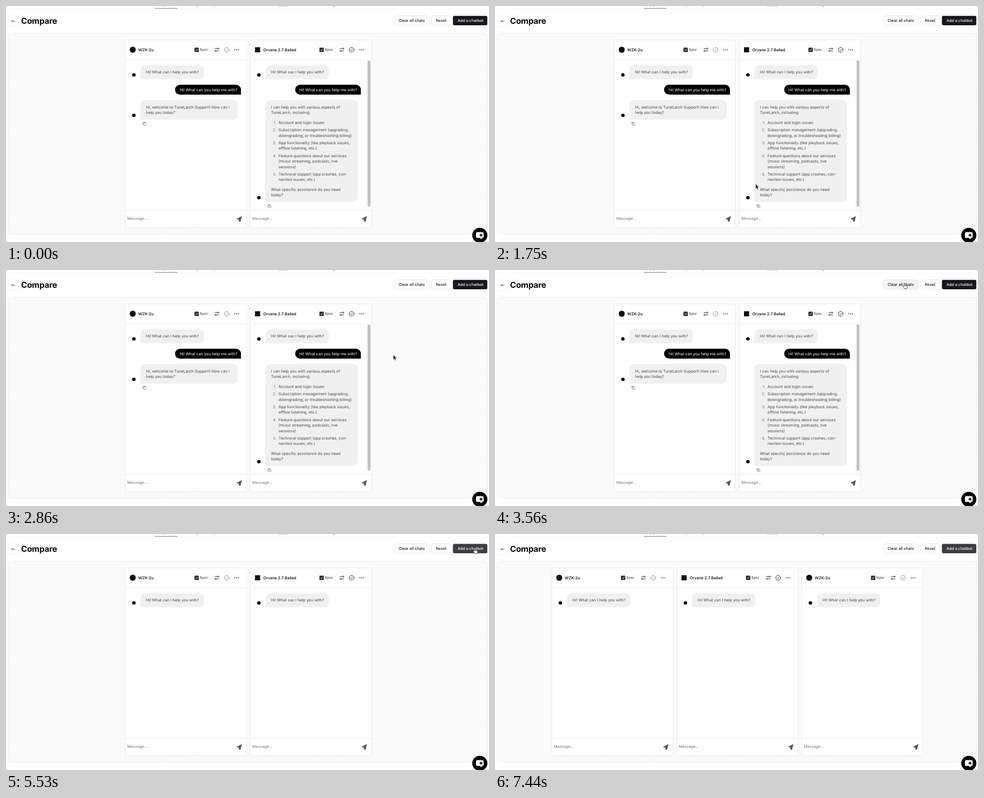
Recreate the animation shown at these times as an HTML page. Size 997x490 px, loop 8000 ms.

```html
<!DOCTYPE html>
<html lang="en">
<head>
<meta charset="utf-8">
<title>Compare</title>
<style>
  html, body { margin: 0; width: 100%; height: 100%; overflow: hidden; background: #fff; }
  svg { display: block; width: 100%; height: 100%; }
  text { font: 400 8px Inter, sans-serif; fill: #484848; text-rendering: geometricPrecision; white-space: pre; }
  .title { font-size: 17px; font-weight: 700; letter-spacing: -.2px; fill: #09090b; }
  .label { font-weight: 500; fill: #18181b; }
  .name { font-weight: 600; fill: #18181b; }
  .sync { font-size: 7px; font-weight: 500; fill: #333; }
  .said { fill: #fff; }
  .hint { fill: #757575; }
  .num { fill: #777; text-anchor: end; }
  .line { fill: none; stroke: #27272a; stroke-linecap: round; stroke-linejoin: round; }
</style>
</head>
<body>
<svg viewBox="0 0 997 490">
  <defs>
    <pattern id="dots" x="5" y="57" width="9.1" height="9.1" patternUnits="userSpaceOnUse">
      <circle cx="4.5" cy="4.5" r=".5" fill="#d9d9dc"/>
    </pattern>
    <linearGradient id="shade" x2="0" y2="1">
      <stop stop-color="#f4f4f4"/><stop offset="1" stop-color="#fff"/>
    </linearGradient>
    <clipPath id="body"><path d="M0 111H252V423H0z"/></clipPath>
  </defs>
  <rect width="997" height="490" fill="#fff"/>

  <g>
    <rect x="561" y="-6" width="23" height="8" rx="2" fill="#e6e3fa"/>
    <g id="tabs"></g>
    <path d="M0 6.5H997" stroke="#f7f7f7"/>
    <path d="M307 5H354" stroke="#66666a" stroke-width="1.2"/>
  </g>

  <rect x="4.5" y="20.5" width="22" height="22" rx="3" fill="#fff" stroke="#f1f1f2"/>
  <path class="line" d="M18.5 31.5H12M14.6 28.9L12 31.5L14.6 34.1" stroke-width=".8"/>
  <text class="title" x="31" y="36.5">Compare</text>
  <g id="buttons"></g>

  <rect x="4.5" y="56.5" width="989" height="417" rx="5" fill="#fafafa" stroke="#ececee"/>
  <rect x="5" y="57" width="988" height="416" rx="5" fill="url(#dots)"/>
  <g id="panels"></g>

  <circle cx="978" cy="476" r="15.6" fill="#000"/>
  <path d="M973 469.5h10a3 3 0 0 1 3 3v6a3 3 0 0 1-3 3h-1v3.2l-4-3.2h-5a3 3 0 0 1-3-3v-6a3 3 0 0 1 3-3z" fill="#fff"/>
  <path d="M980.5 471.8l1.2 2.8 2.8 1.2-2.8 1.2-1.2 2.8-1.2-2.8-2.8-1.2 2.8-1.2z" fill="#000"/>

  <g id="cursor">
    <path id="arrow" d="M0 0V10.2L2.3 8.1L3.9 11.8L5.6 11L4 7.4H7.2z" fill="#000" stroke="#fff" stroke-width=".7"/>
    <path id="hand" d="M-1 .6C-1-.6 .9-.6 .9 .6V4.2C1.2 3.3 2.6 3.5 2.7 4.5C3.1 3.8 4.3 4 4.4 4.9C4.9 4.4 6 4.7 6 5.7V8C6 9.4 5 9.9 5 11.2H-.4C-.5 9.8-2.4 8.3-3 6.5C-3.4 5.3-2.2 4.8-1.6 5.6L-1 6.5zM.9 4.2V6.2M2.7 4.5V6.2M4.4 4.9V6.2" fill="#fff" stroke="#222" stroke-width=".8" stroke-linejoin="round"/>
  </g>
</svg>

<script>
const LOOP = 8000, CLEARED = 4480, ADDED = 6430, SLIDE = 280;
const GAP = 258, FIRST_X = 246, SHIFT = 129;
const byId = id => document.getElementById(id);
const show = (node, on) => node.setAttribute('visibility', on ? 'visible' : 'hidden');
const text = (cls, x, y, value) => `<text class="${cls}" x="${x}" y="${y}">${value}</text>`;

byId('tabs').innerHTML = [[309, 'Playground'], [369, 'Activity'], [411, 'Analytics'], [653, 'Settings']]
  .map(([x, label]) => text('label', x, -1, label)).join('');

const buttons = [
  { x: 801, w: 73, label: 'Clear all chats', tx: 810.5, fill: '#fff', hover: '#f4f4f5', edge: '#e9e9eb' },
  { x: 878, w: 40, label: 'Reset', tx: 887.5, fill: '#fff', hover: '#f4f4f5', edge: '#e9e9eb' },
  { x: 922, w: 72, label: 'Add a chatbot', tx: 932, fill: '#18181b', hover: '#3d3d40', edge: 'none', cls: 'label said' }
];
byId('buttons').innerHTML = buttons.map(b =>
  `<rect x="${b.x + .5}" y="20.5" width="${b.w - 1}" height="19.5" rx="3" stroke="${b.edge}"/>` +
  `<text class="label" x="${b.tx}" y="33.2"${b.cls ? ' style="fill:#fafafa"' : ''}>${b.label}</text>`).join('');
const buttonRects = [...byId('buttons').querySelectorAll('rect')];

// A speech bubble with one tight lower corner.
function bubble(x, y, w, h, fill, tight) {
  const r = 10, l = tight === 'left' ? 1 : r, k = tight === 'left' ? r : 1;
  return `<path fill="${fill}" d="M${x + r} ${y}h${w - 2 * r}a${r} ${r} 0 0 1 ${r} ${r}V${y + h - k}` +
    `a${k} ${k} 0 0 1 ${-k} ${k}H${x + l}a${l} ${l} 0 0 1 ${-l} ${-l}V${y + r}a${r} ${r} 0 0 1 ${r} ${-r}z"/>`;
}
const avatar = y => `<circle cx="18" cy="${y}" r="3.6" fill="#000"/>`;
const copyIcon = (x, y) => `<g class="line" stroke-width=".7" style="stroke:#555">
  <rect x="${x + 1.8}" y="${y + 1.8}" width="4.6" height="4.6" rx=".8"/>
  <path d="M${x + .9} ${y + 4.6}q-.8 0-.8-.8v-3q0-.8.8-.8h3q.8 0 .8.8"/></g>`;
const lines = (x, rows) => rows.map(([y, s]) => text('', x, y, s)).join('');

const shortChat = bubble(103, 163.5, 136, 20.5, '#000', 'right') +
  text('said', 112.5, 176.5, 'Hi! What can you help me with?') +
  bubble(31.5, 195, 200.5, 41, '#f0f0f0', 'left') + avatar(227) +
  lines(43, [[212.8, 'Hi, welcome to TuneLarch Support! How can I'], [224.2, 'help you today?']]) +
  copyIcon(36.3, 241.3);

const topics = [
  [245.2, 'Account and login issues'],
  [260.4, 'Subscription management (upgrading,', 'downgrading, or troubleshooting billing)'],
  [287, 'App functionality (like playback issues,', 'offline listening, etc.)'],
  [313.8, 'Feature questions about our services', '(music streaming, podcasts, live', 'sessions)'],
  [351.8, 'Technical support (app crashes, con-', 'nection issues, etc.)']
];
const longChat = bubble(93, 163.5, 135.5, 20.5, '#000', 'right') +
  text('said', 101.7, 176.5, 'Hi! What can you help me with?') +
  bubble(31.5, 195, 190.5, 212, '#f0f0f0', 'left') + avatar(398) +
  lines(43, [[212.8, 'I can help you with various aspects of'], [224.2, 'TuneLarch, including:'],
    [384, 'What specific assistance do you need'], [395.4, 'today?']]) +
  topics.map(([y, ...rows], i) => text('num', 54, y, i + 1 + '.') +
    lines(58.6, rows.map((s, k) => [y + 11.4 * k, s]))).join('') +
  copyIcon(36.3, 412.5) +
  `<path d="M240.5 112V423" stroke="#f2f2f2"/>
   <rect class="thumb" x="242.4" y="113.5" width="6" height="302.5" rx="1"/>`;

function panel(name, mark, checkColor, chat) {
  return `<g>
    <rect x=".5" y="70.5" width="250" height="389" rx="3" fill="#fff" stroke="#ececed"/>
    <rect x="1" y="110" width="249" height="4" fill="url(#shade)"/>
    ${mark}${text('name', 27, 93.8, name)}
    <rect x="143" y="86.4" width="9" height="9" rx="1.2" fill="#2e2e31"/>
    <path d="M145.1 91L146.8 92.8L150 89" fill="none" stroke="#fff"/>
    ${text('sync', 154, 93.4, 'Sync')}
    <path d="M175.5 85V97" stroke="#ececed"/>
    <g class="line"><path d="M185.2 88.6H190M187.5 93.3H193.5"/>
      <circle cx="191.7" cy="88.6" r="1.5"/><circle cx="186.4" cy="93.3" r="1.5" fill="#fff"/>
      <circle cx="209.5" cy="91" r="4.9" stroke="${checkColor}"/>
      <path d="M207.4 91.1L209 92.6L211.7 89.6" stroke="${checkColor}"/></g>
    <path d="M226.4 91h.01M230 91h.01M233.6 91h.01" class="line" stroke-width="2"/>
    <g clip-path="url(#body)">
      ${bubble(31.5, 123, 131, 29, '#f0f0f0', 'left')}${avatar(143)}
      ${text('', 43, 140.1, 'Hi! What can I help you with?')}
      <g class="chat">${chat}</g>
    </g>
    <path d="M1 423.5H250" stroke="#ececed"/>
    ${text('hint', 4.5, 444, 'Message...')}
    <path d="M230.4 441.8L240.6 436.8L237.8 447.8L234.8 446.4V443.3z" fill="#555" stroke="#555" stroke-width=".6" stroke-linejoin="round"/>
  </g>`;
}

const round = '<circle cx="15.6" cy="90.8" r="6.3" fill="#111"/>';
const square = '<rect x="10" y="85.6" width="10.6" height="10.6" fill="#111"/>';
byId('panels').innerHTML =
  panel('WZK-2u', round, '#8a8a8e', shortChat) +
  panel('Orvane 2.7 Ballad', square, '#18181b', longChat) +
  panel('WZK-2u', round, '#8a8a8e', '');
const panels = [...byId('panels').children];
const chats = document.querySelectorAll('.chat');
const thumb = document.querySelector('.thumb');

// Pointer stops: time, x, y.
const path = [
  [1570, 430, 478], [1750, 538, 369.5], [2350, 747.3, 315], [2480, 747.3, 315],
  [3230, 849, 44], [3360, 849, 44], [3560, 845, 27.5], [5130, 845, 27.5], [5530, 967.5, 29.5]
];
const clamp = v => Math.max(0, Math.min(1, v));
const easeOut = v => 1 - (1 - v) ** 3;
const smooth = v => v * v * (3 - 2 * v);

function pointerAt(t) {
  if (t <= path[0][0]) return path[0].slice(1);
  const next = path.findIndex(p => p[0] > t);
  if (next < 0) return path.at(-1).slice(1);
  const a = path[next - 1], b = path[next];
  const k = (t - a[0]) / (b[0] - a[0]);
  const e = next === 1 ? k : smooth(k);
  return [a[1] + (b[1] - a[1]) * e, a[2] + (b[2] - a[2]) * e];
}

function render(t) {
  const [x, y] = pointerAt(t);
  const visible = t >= 1570 && t < 7440;
  const hovered = buttons.findIndex(b => y > 20 && y < 41 && x >= b.x && x <= b.x + b.w);
  buttonRects.forEach((r, i) => r.setAttribute('fill', i === hovered ? buttons[i].hover : buttons[i].fill));
  byId('cursor').setAttribute('transform', `translate(${x} ${y})`);
  show(byId('arrow'), visible && hovered < 0);
  show(byId('hand'), visible && hovered >= 0);

  const onThumb = x > 745 && x < 754 && y > 113 && y < 416;
  thumb.setAttribute('fill', onThumb ? '#787878' : '#c1c1c1');
  chats.forEach(c => show(c, t < CLEARED));

  const k = easeOut(clamp((t - ADDED) / SLIDE));
  panels.forEach((p, i) =>
    p.setAttribute('transform', `translate(${FIRST_X + i * GAP - SHIFT * k} 0)`));
  panels[2].setAttribute('opacity', k);
}

const start = performance.now();
function tick() {
  render((performance.now() - start) % LOOP);
  requestAnimationFrame(tick);
}
tick();
</script>
</body>
</html>
```
